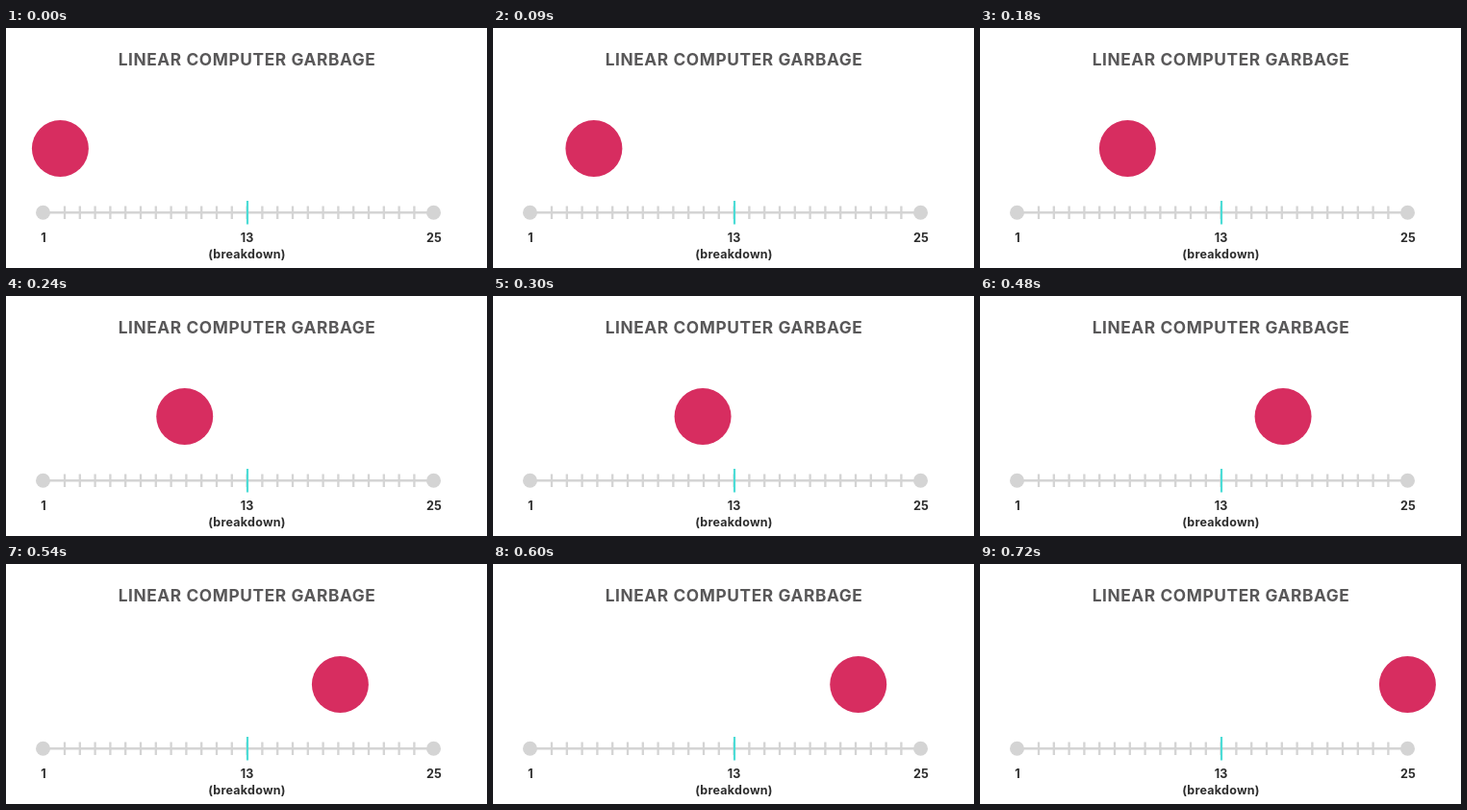
These frames come from a looping animation (500x250 px, 0.75 s). An HTML page:

```html
<!DOCTYPE html>
<html lang="en">
<head>
<meta charset="utf-8">
<title>Linear computer garbage</title>
<style>
  html, body { margin: 0; width: 100%; height: 100%; overflow: hidden; background: #fff; }
  svg { display: block; }
  text { font: 700 12.5px Inter, sans-serif; letter-spacing: .25px; text-anchor: middle; fill: #2d2d2d; }
  .title { font-size: 17.3px; letter-spacing: .6px; fill: #595859; }
  .axis { fill: #d4d4d4; stroke: #d4d4d4; }
</style>
</head>
<body>
<svg width="500" height="250" viewBox="0 0 500 250">
  <text class="title" x="250.5" y="38.8">LINEAR COMPUTER GARBAGE</text>
  <g class="axis">
    <path d="M38.5 192.3H444.5" stroke-width="2.6"/>
    <path id="ticks" stroke-width="2.3"/>
    <circle cx="38.5" cy="192.2" r="7.5" stroke="none"/>
    <circle cx="444.5" cy="192.2" r="7.5" stroke="none"/>
  </g>
  <path d="M251 180V204.5" stroke="#4cdcd6" stroke-width="2.2"/>
  <text x="39" y="223.3">1</text>
  <text x="250.7" y="223.3">13</text>
  <text x="445" y="223.3">25</text>
  <text x="250.5" y="239.6">(breakdown)</text>
  <circle id="ball" cx="56.4" cy="125.5" r="29.5" fill="#d72d60"/>
</svg>
<script>
  const STEPS = 25, STEP_MS = 30, START_X = 56.4, END_X = 444.4;
  const ball = document.getElementById('ball');

  document.getElementById('ticks').setAttribute('d',
    Array.from({ length: 24 }, (_, i) => `M${61 + i * 15.8} 185.5v13.5`).join(''));

  const startTime = performance.now();
  function draw() {
    const elapsed = performance.now() - startTime;
    const step = Math.floor(elapsed / STEP_MS) % STEPS;
    ball.setAttribute('cx', START_X + (END_X - START_X) * step / (STEPS - 1));
    requestAnimationFrame(draw);
  }
  draw();
</script>
</body>
</html>
```
